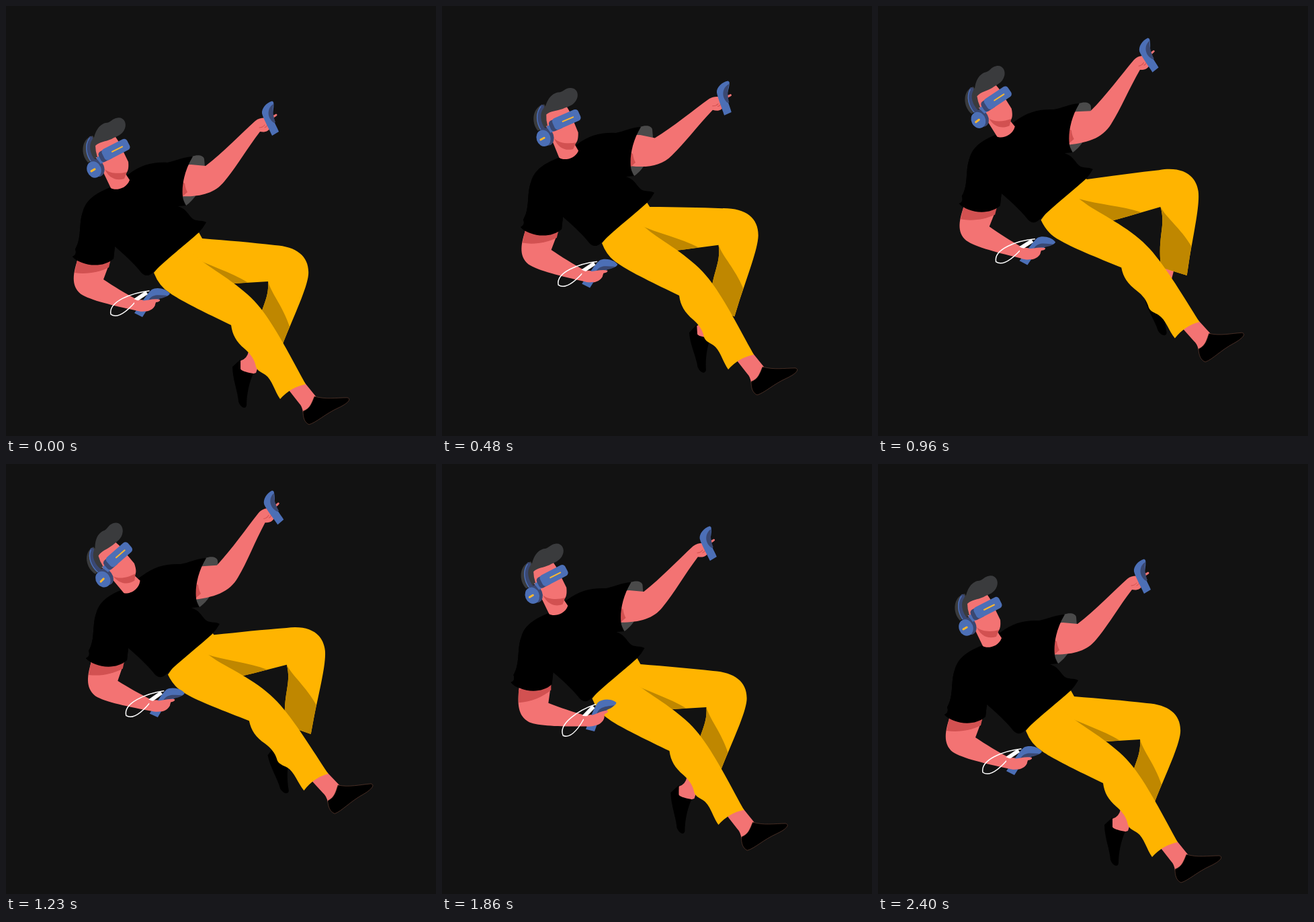
These frames come from a looping animation (640x640 px, 2.43 s). An HTML page:

```html
<!DOCTYPE html>
<html lang="en">
<head>
<meta charset="utf-8">
<title>Floating in VR</title>
<style>
  html, body { margin: 0; width: 100%; height: 100%; overflow: hidden; background: #121212; }
  svg { display: block; width: 100vw; height: 100vh; }
  .skin { fill: #f37373 }
  .shade { fill: #d25151 }
  .pants { fill: #ffb400 }
  .fold { fill: #bf8700 }
  .blue { fill: #4c6fb6 }
  .navy { fill: #3a4872 }
  .hair { fill: #3a3b3d }
  .lining { fill: #4a4a4a }
  .line { fill: none; stroke-linecap: round }
</style>
</head>
<body>
<svg viewBox="0 0 640 640">
  <g id="body">
    <path class="lining" d="M277 224C285 221 294 222 295 228L296 240C297 262 283 287 268 297L255 270Z"/>

    <g id="raisedArm">
      <path class="skin" d="M250 238L275 236L297 238C322 219 350 190 371 171C377 166 384 166 390 167L402 160.500Q405 162 402 164L396 168L394 180C390 188 384 188 378 187C358 213 342 241 325 261C309 281 285 285 250 283Z"/>
      <path class="line" stroke="#d25151" d="M377 181Q382 181 385 177M385 181Q388 180 389 177"/>
      <path class="blue" d="M396 141.500C387 144 380 153 381 160C383 168 393 186 396 193L406 187C402 177 396 169 397 160C398 153 399 147 398 143Z"/>
      <path class="navy" d="M398 146C389 151 387 166 399 174L401 173C398 165 396 155 398 146Z"/>
    </g>
    <path class="shade" d="M262 262L266 264Q267 272 270 277L262 284Z"/>

    <g id="backLeg">
      <path class="skin" d="M376 494L389 506Q378 526 372 546L362 549L348 541L349 528Q359 525 361 514Z"/>
      <path d="M349 526L337 537C337 555 345 574 346 589C349 598 357 601 358 594C358 578 362 560 368 547Q350 544 349 540Z"/>
      <path class="pants" d="M240 370L287 337L292 346C330 349 365 352 400 356C434 358 452 374 450 400C448 420 430 458 413 500L406 518L371 498C376 450 392 440 390 410L340 413L300 415L260 400Z"/>
      <path class="fold" d="M275 372C300 386 335 396 360 411.500L340 413L300 415L275 400Z"/>
      <path class="fold" d="M390 410C395 428 412 447 422 477L413 500L406 518L371 498C376 450 392 440 390 410Z"/>
    </g>

    <g id="frontLeg">
      <path class="skin" d="M418 568L444 560L461 581L456 600L442 605Q441 596 436 591Z"/>
      <path stroke="#80503f" stroke-width=".5" d="M459 581C475 586 492 583 508 583C515 585 508 592 495 598C475 607 462 620 451 623C444 620 442 612 442 603C453 599 455 590 459 581Z"/>
      <path class="pants" d="M220 397L255 355L275 366L292 380C315 397 356 420 379 450C402 479 426 527 446 563Q424 567 408 585C400 574 396 556 386 549C380 545 374 543 372 537C370 526 364 518 356 511C343 500 337 490 335 475C300 458 262 440 245 428Q228 418 220 397Z"/>
    </g>

    <path d="M155 270C138 277 119 286 114 307C108 325 113 345 103 362Q106 370 99 373C110 386 143 392 160 376L162 358C175 369 190 383 199 394Q208 407 219 396.500C240 376 265 357 287 337Q293 331 298 322C291 318 282 321 277 316C270 309 268 302 256 298L268 297C260 290 259 255 278 224C262 225 252 231 240 233C218 232 200 237 183 250Z"/>

    <g id="loweredArm">
      <path class="skin" d="M112 355L152 355L155 380L145 407C160 417 178 428 195 437L215 438L222 445C219 453 208 457 197 454C160 446 125 438 111 428.500C96 416 100 397 107 376Z"/>
      <path class="shade" d="M106 378L156 376L153 389C140 396 120 400 102 397Z"/>
      <path class="line" stroke="#fff" stroke-width="1.500" d="M213 424C187 427 152 440 156 459C169 468 188 446 197 435"/>
      <path class="blue" d="M191 457L203 463L210 452L230 434Q242 433 244 428C238 420 224 418 217 422C209 429 203 440 191 457Z"/>
      <path class="navy" d="M211 440C217 427 229 431 240 431C234 437 223 434 218 440Z"/>
      <path fill="#fff" d="M190 436L208 424L211 429L196 439Z"/>
      <path class="skin" d="M190 436C203 443 216 434 229 437Q230 440 223 441C221 452 207 458 193 453Z"/>
    </g>
    <path d="M114 307C108 325 113 345 103 362Q106 370 99 373C110 386 143 392 160 376L162 358L150 300Z"/>

    <g id="head">
      <path class="hair" d="M129 193C112 197 110 221 122 233L136 226L136 205Z"/>
      <path class="skin" d="M131 205L161 192L167 201L182 232C183 243 181 247 178 250L184 259C179 273 162 275 156 271L144 246L134 226Z"/>
      <path class="shade" d="M147 243C155 250 169 250 180 247L176 257C164 261 153 256 147 243Z"/>
      <path class="hair" d="M129 206C131 192 135 178 148 174C156 174 158 167 166 166.500C175 165 180 174 177 182C173 193 164 194 157 198C148 202 139 202 133 208Q133 216 136 225L130 225Z"/>
      <path class="line" stroke="#3a4872" stroke-width="6" d="M126 197C119 207 122 221 130 231"/>
      <path class="line" stroke="#4c6fb6" stroke-width="1.500" d="M124 197C117 207 119 221 126 231"/>
      <ellipse class="navy" cx="136" cy="241" rx="10" ry="13.500" transform="rotate(-22 136 241)"/>
      <ellipse class="blue" cx="131" cy="243.500" rx="10.500" ry="12.500" transform="rotate(-22 131 243.500)"/>
      <path class="blue" d="M134 226L143 221L148 231L141 235Z"/>
      <g transform="rotate(-27 161 215.500)">
        <rect class="navy" x="137" y="207" width="20" height="17" rx="5"/>
        <rect class="blue" x="143" y="206" width="42" height="18" rx="5"/>
      </g>
      <path class="line" stroke="#ffb92e" stroke-width="2" d="M158 217L173 209.500"/>
      <path class="line" stroke="#ffb92e" stroke-width="3" d="M127 246L132 243"/>
    </g>
  </g>
</svg>
<script>
const LOOP = 2430;
const times = [0, 480, 750, 1230, 1620, 1860, 2400];
const drift = { x: [0, 18, 21, 20, 10.500, 3.500, 0], y: [0, -44, -67, -84, -66.500, -48, 0] };

// Each joint turns about its pivot; angles in degrees match the key times.
const joints = {
  raisedArm:  { pivot: [275, 255], angles: [0, 6.400, -3.200, -9.300, -4.100, -0.500, 0] },
  loweredArm: { pivot: [135, 360], angles: [0, 0.500, 2, -1.600, -8.900, -12.400, 0] },
  backLeg:    { pivot: [250, 355], angles: [0, -4.100, -11, -10.800, -1.600, 0, 0] },
  frontLeg:   { pivot: [228, 385], angles: [0, 0, -1.900, -4.600, -1, 0, 0] },
  head:       { pivot: [176, 276], angles: [0, 3.500, 1, -14.300, -3.900, -0.300, 0] }
};

const step = (v, i) => (v[i + 1] - v[i]) / (times[i + 1] - times[i]);

function slope(v, i) {
  if (i === 0) return step(v, 0);
  if (i === times.length - 1) return step(v, i - 1);
  const before = times[i] - times[i - 1], after = times[i + 1] - times[i];
  return (step(v, i - 1) * after + step(v, i) * before) / (before + after);
}

// Smooth cubic curve through the key values
function sample(v, t) {
  let i = 0;
  while (i < times.length - 2 && t >= times[i + 1]) i++;
  const h = times[i + 1] - times[i], s = (t - times[i]) / h, r = 1 - s;
  return v[i] * (1 + 2 * s) * r * r + v[i + 1] * s * s * (3 - 2 * s)
    + h * s * r * (slope(v, i) * r - slope(v, i + 1) * s);
}

const setTransform = (id, value) => document.getElementById(id).setAttribute("transform", value);

function draw(now) {
  const t = Math.min(now % LOOP, 2400);
  setTransform("body", `translate(${sample(drift.x, t)} ${sample(drift.y, t)})`);
  for (const [id, { pivot, angles }] of Object.entries(joints))
    setTransform(id, `rotate(${sample(angles, t)} ${pivot})`);
  requestAnimationFrame(() => draw(performance.now() - start));
}
const start = performance.now();
draw(0);
</script>
</body>
</html>
```
